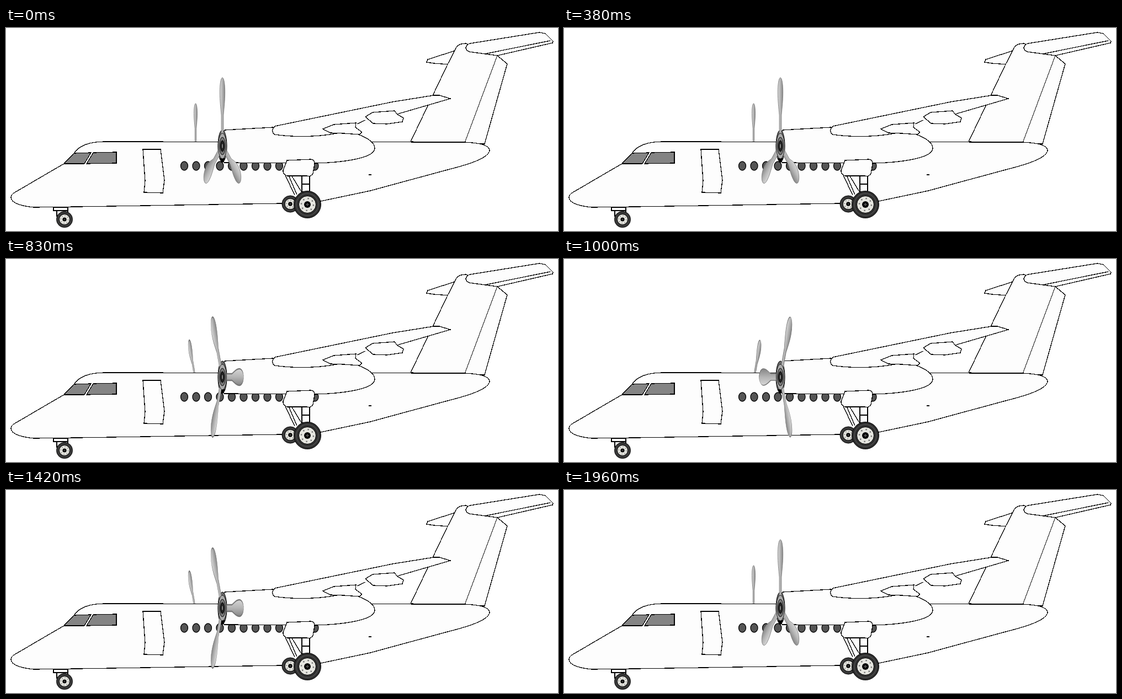
An HTML page for the animation above (2000 ms loop, 1000 px wide and 368 px high).

```html
<!DOCTYPE html>
<html lang="en">
<head>
<meta charset="utf-8">
<title>Turboprop</title>
<style>
  html, body { margin: 0; width: 100%; height: 100%; overflow: hidden; background: #fff; }
  svg { display: block; width: 100vw; height: 100vh; }
  .line { fill: #fdfdfd; stroke: #000; stroke-width: 1.3; shape-rendering: crispEdges; }
  .open { fill: none; }
  .glass { fill: #848484; }
  .window { fill: #555; stroke: #000; stroke-width: 1.3; }
  .blade { fill: url(#metal); stroke: #777; stroke-width: .8; vector-effect: non-scaling-stroke; }
</style>
</head>
<body>
<svg viewBox="0 0 1000 368">
  <defs>
    <linearGradient id="metal">
      <stop offset="0" stop-color="#d6d6d6"/>
      <stop offset=".5" stop-color="#b4b4b4"/>
      <stop offset="1" stop-color="#858585"/>
    </linearGradient>
    <path id="blade" class="blade" d="M-6-18 L-6-56 C-10-70 -15-82 -15-98 C-15-114 -8-124 0-124 C8-124 15-114 15-98 C15-82 10-70 6-56 L6-18Z"/>
    <g id="rotor">
      <use href="#blade"/>
      <use href="#blade" transform="rotate(120)"/>
      <use href="#blade" transform="rotate(240)"/>
    </g>
    <g id="wheel">
      <circle r="24.5" fill="#2c2c2c" stroke="#000"/>
      <circle r="20" fill="none" stroke="#484848" stroke-width="2"/>
      <circle r="15.5" fill="#e6e6e0" stroke="#000"/>
      <circle r="11" fill="none" stroke="#777" stroke-width="2.4" stroke-dasharray="2.5 6.14"/>
      <circle r="6" fill="#000"/>
      <path d="M-3 0H3M0-3V3" stroke="#777"/>
    </g>
  </defs>

  <g transform="translate(343.5 220) scale(.2 .67)"><use class="rotor" href="#rotor"/></g>

  <!-- tail -->
  <g class="line">
    <path d="M817 40 L764 57 L762 62 L775 64 L803 66Z"/>
    <path d="M733 206 L800 66 L816 35 Q820 28 833 28 L890 50 L908 65 L867 210Z"/>
    <path class="open" d="M890 50 L831 208" stroke="#444"/>
    <path d="M833 36 Q835 29 841 28 L966 8 L977 10 L991 24 L990 27 L890 50 L839 43 Q834 41 833 36Z"/>
    <path class="open" d="M867 47 L986 23"/>
  </g>

  <!-- fuselage -->
  <path class="line" d="M9 307 Q9 302 16 298 L105 246 L124 226 Q138 206 180 206 L831 207 Q876 209 876 222 C874 236 840 247 796 258 L660 295 L570 314 L500 318 L130 324 L50 325 Q10 321 9 307Z"/>
  <g class="line">
    <path class="glass" d="M105 246 L123 227 L154 226 L142 246Z"/>
    <path class="glass" d="M146 246 L158 226 L200 225 L200 245Z"/>
    <path d="M248 220 L280 220 L287 276 L284 299 L250 298 L252 277Z"/>
    <path class="open" d="M657 266H662"/>
  </g>
  <g id="windows"></g>

  <!-- nacelle and wing -->
  <g class="line">
    <path stroke="none" d="M396 185 L484 180 L640 194 Q668 204 668 218 C668 236 610 244 560 245 L395 244 Q387 214 396 185Z"/>
    <path class="open" d="M484 180 L396 185 Q381 214 395 244 L560 245 C610 244 668 236 668 218 Q668 204 638 193"/>
    <path stroke="none" d="M487 178 L775 122 L785 122 L805 128 L690 163 L612 191 L540 197 L486 193 Q479 186 487 178Z"/>
    <path class="open" d="M709 156 L805 128 L785 122 L775 122 L700 134 L487 178 Q479 186 486 193 Q542 201 600 191 M651 167 L636 174"/>
    <path d="M651 161 L664 153 L704 150 L708 156 L720 163 L718 170 L690 174 L665 173Z"/>
    <path d="M574 183 L594 175 L634 172 L633 180 L645 189 L640 193 L612 191 L587 190Z"/>
  </g>

  <!-- landing gear -->
  <use href="#wheel" transform="translate(515 319) scale(.62)"/>
  <g class="line">
    <path d="M506 267 L523 303 M512 267 L527 302 M517 267 L537 300 M536 267 H550 V297 H536Z M536 283H550"/>
    <path d="M509 240 L552 238 Q559 238 559 246 L556 264 Q552 270 545 268 L509 268 Q501 265 502 258Z"/>
    <path d="M86 325H112V331H86Z M92 331H112V341H92Z"/>
  </g>
  <use href="#wheel" transform="translate(546 320)"/>
  <use href="#wheel" transform="translate(106 347) scale(.6)"/>

  <!-- near propeller -->
  <g transform="translate(392 214)">
    <ellipse rx="8" ry="29" fill="#666" stroke="#000"/>
    <path d="M-5 22 L0 31 L5 22Z"/>
    <g transform="scale(.31 1)"><use class="rotor" href="#rotor"/></g>
    <ellipse rx="7.5" ry="23" fill="#aaa" stroke="#222"/>
    <ellipse rx="5.5" ry="16" fill="#777" stroke="#111"/>
    <ellipse rx="3.5" ry="10" fill="#222" stroke="#000"/>
    <ellipse rx="1" ry="4" fill="#888"/>
  </g>
</svg>
<script>
  const LOOP = 2000, FPS = 24, POSE_MS = 40;
  const POSES = [0, 30, 90];

  document.getElementById('windows').innerHTML = Array.from({ length: 12 }, (_, i) =>
    `<ellipse class="window" cx="${323 + 21.5 * i}" cy="250" rx="6.5" ry="8"/>`).join('');

  const rotors = document.querySelectorAll('.rotor');

  // The 40 ms poses are sampled at 24 fps, with change times rounded to 10 ms.
  function draw(time) {
    const frame = Math.floor((time % LOOP + 4) * FPS / 1000) % (LOOP * FPS / 1000);
    const pose = Math.floor(frame * 1000 / (FPS * POSE_MS)) % POSES.length;
    for (const rotor of rotors) rotor.setAttribute('transform', `rotate(${POSES[pose]})`);
  }

  const start = performance.now();
  function tick() {
    draw(performance.now() - start);
    requestAnimationFrame(tick);
  }
  tick();
</script>
</body>
</html>
```
